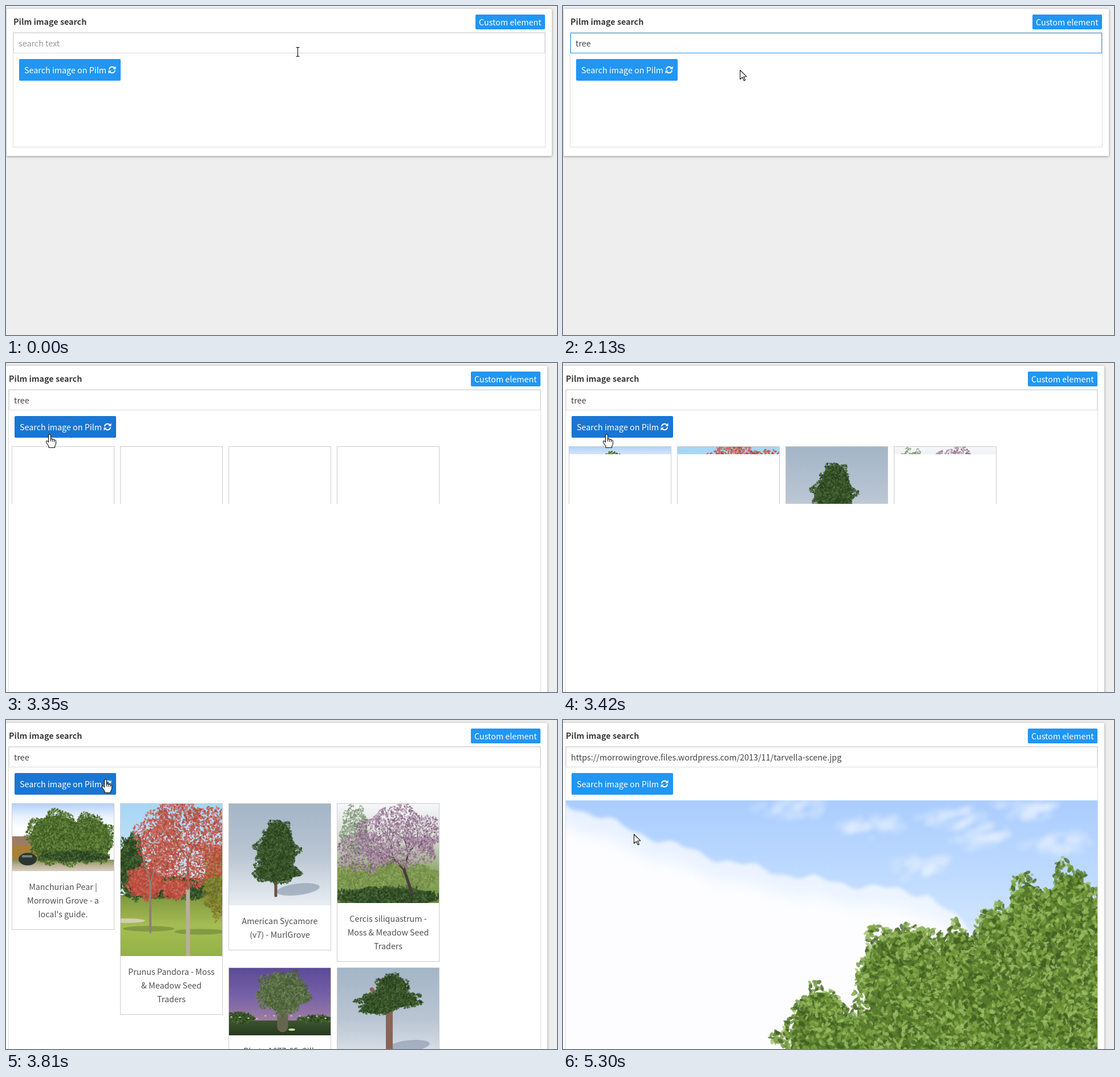
These frames come from a looping animation (966 by 577 pixels, 7390 ms). An HTML page with a canvas:

```html
<!DOCTYPE html>
<html lang="en">
<head>
<meta charset="utf-8">
<title>Image search</title>
<style>
  html, body { margin: 0; width: 966px; height: 577px; overflow: hidden; background: #eee; }
  canvas { display: block; }
</style>
</head>
<body>
<canvas id="stage" width="966" height="577"></canvas>
<script>
const W = 966, H = 577, LOOP = 7390;
const ctx = document.getElementById('stage').getContext('2d');
const FACE = '"Noto Sans CJK JP", "Noto Sans CJK SC", "Noto Sans CJK", "Noto Sans", sans-serif';
const BODY = `14.32px ${FACE}`, BOLD = `700 14.32px ${FACE}`;
const BLUE = '#2196f3', LINE = '#ddd', INK = '#444';
const URL_TEXT = 'https://morrowingrove.files.wordpress.com/2013/11/tarvella-scene.jpg';

let seed = 7;
function rand() {
  seed = (seed + 0x6d2b79f5) | 0;
  let v = Math.imul(seed ^ (seed >>> 15), 1 | seed);
  v = (v + Math.imul(v ^ (v >>> 7), 61 | v)) ^ v;
  return ((v ^ (v >>> 14)) >>> 0) / 4294967296;
}
const spread = range => (rand() - .5) * 2 * range;

// ---- painting helpers ----
function layer() {
  const c = document.createElement('canvas');
  c.width = W; c.height = H;
  return c.getContext('2d');
}
function box(g, x, y, w, h, fill) { g.fillStyle = fill; g.fillRect(x, y, w, h); }
function frame(g, x, y, w, h, color) {
  g.strokeStyle = color; g.lineWidth = 1;
  g.strokeRect(x + .5, y + .5, w - 1, h - 1);
}
function fade(g, y0, y1, ...colors) {
  const grad = g.createLinearGradient(0, y0, 0, y1);
  colors.forEach((c, i) => grad.addColorStop(i / (colors.length - 1), c));
  return grad;
}
function oval(g, x, y, rx, ry, fill, turn = 0) {
  g.fillStyle = fill;
  g.beginPath(); g.ellipse(x, y, rx, ry, turn, 0, 7); g.fill();
}
// A wobbling ellipse of leaves; dense crowns get a solid core.
function crown(g, x, y, rx, ry, size, colors, density = 1.6) {
  if (density > 1) oval(g, x, y, rx * .84, ry * .84, colors[1]);
  const count = rx * ry * 4 * density / (size * size);
  g.globalAlpha = .75;
  for (let i = 0; i < count; i++) {
    const a = rand() * 7, lobes = 1 + .09 * Math.sin(a * 5 + x) + .07 * Math.sin(a * 9 + y);
    const r = Math.sqrt(rand()) * lobes;
    const color = colors[Math.floor(rand() * colors.length)];
    oval(g, x + Math.cos(a) * rx * r, y + Math.sin(a) * ry * r,
      size * (.5 + rand() * .6), size * (.3 + rand() * .3), color, rand() * 3);
  }
  g.globalAlpha = 1;
}
// A stem that forks until its depth runs out.
function branch(g, color, x, y, length, width, depth = 0, angle = -Math.PI / 2) {
  const x2 = x + Math.cos(angle) * length, y2 = y + Math.sin(angle) * length;
  g.strokeStyle = color; g.lineWidth = width; g.lineCap = 'round';
  g.beginPath(); g.moveTo(x, y); g.lineTo(x2, y2); g.stroke();
  if (!depth) return;
  for (const side of [-1, 1]) {
    branch(g, color, x2, y2, length * .75, width * .6, depth - 1, angle + side * (.25 + rand() * .4));
  }
}
function inside(g, x, y, w, h, paint) {
  g.save();
  g.beginPath(); g.rect(x, y, w, h); g.clip();
  paint(g);
  g.restore();
}

const GREEN = ['#385421', '#4a6829', '#5d7d34', '#74934a'];
const DARK = ['#243b1d', '#314d26', '#3f5c2e', '#52703d'];
const FRESH = ['#405f22', '#557a2c', '#698f36', '#7fa546', '#9cbd66'];
const RED = ['#a3493c', '#b94b3d', '#c95746', '#d27361'];
const PINK = ['#785e74', '#977791', '#aa89a6', '#bda1bb'];

// ---- thumbnails, each painted in a 180 px wide column ----
function studio(g, h, shadowX, shadowY) {
  box(g, 0, 0, 180, h, fade(g, 0, h, '#a4b5c7', '#b9c5d2', '#e9eef3'));
  oval(g, shadowX, shadowY, 38, 10, '#8d9db0aa', -.12);
}
function bushPhoto(g) {
  box(g, 0, 0, 180, 118, fade(g, 0, 45, '#b4d2f8', '#eaf2fd', '#fff'));
  box(g, 0, 60, 50, 40, '#a98038');
  box(g, 0, 57, 34, 16, '#9b7c67');
  box(g, 0, 98, 180, 20, fade(g, 98, 118, '#828e55', '#bcb196', '#d5cfc1'));
  crown(g, 78, 61, 53, 48, 2.6, GREEN);
  crown(g, 135, 62, 44, 44, 2.6, GREEN);
  crown(g, 108, 92, 62, 10, 2.6, DARK);
  oval(g, 28, 97, 16, 11, '#2b3633');
  box(g, 18, 90, 18, 4, '#71827d');
}
function redPhoto(g) {
  box(g, 0, 0, 180, 267, fade(g, 0, 150, '#a6d5f5', '#d8ecf7'));
  box(g, 0, 160, 180, 107, fade(g, 160, 267, '#7e963e', '#a5bd53', '#93b247'));
  crown(g, 20, 110, 25, 58, 3, DARK);
  crown(g, 90, 148, 95, 19, 3, DARK);
  crown(g, 170, 137, 25, 62, 3, ['#5d6a2c', '#7e812f', '#99913a']);
  crown(g, 45, 138, 34, 29, 2.5, RED);
  crown(g, 96, 151, 22, 17, 2.5, RED);
  oval(g, 10, 205, 34, 4, '#d0ceb0');
  for (const x of [50, 140]) oval(g, x, 216 + x * .06, 45, 5, '#6d853a99');
  branch(g, '#8d8072', 53, 225, 85, 4, 1);
  branch(g, '#b9ae9c', 119, 267, 118, 7);
  branch(g, '#87675c', 119, 149, 50, 4, 3);
  crown(g, 118, 72, 72, 80, 2.8, RED, 1);
  crown(g, 66, 64, 40, 56, 2.8, RED, .7);
}
function sycamorePhoto(g) {
  studio(g, 178, 122, 150);
  branch(g, '#69513c', 83, 161, 35, 5);
  crown(g, 87, 53, 25, 25, 2.5, DARK);
  crown(g, 84, 84, 39, 31, 2.5, DARK);
  crown(g, 83, 119, 41, 21, 2.5, DARK);
}
function blossomPhoto(g) {
  box(g, 0, 0, 180, 174, fade(g, 0, 174, '#f6f7fa', '#d9ddd8', '#93aa70', '#6f9141'));
  crown(g, 31, 49, 24, 47, 2.5, ['#6d8a65', '#829c76', '#a0b297'], 1);
  crown(g, 90, 128, 100, 27, 3, ['#68853f', '#7b954c', '#91a763']);
  crown(g, 90, 163, 100, 18, 3, DARK);
  branch(g, '#4b3b40', 132, 157, 42, 5, 4, -1.9);
  crown(g, 110, 58, 74, 54, 2.5, PINK, .9);
  crown(g, 46, 85, 46, 36, 2.5, PINK, .8);
}
function duskPhoto(g) {
  box(g, 0, 0, 180, 118, fade(g, 0, 95, '#5b4a98', '#7560a7', '#a07fa3'));
  box(g, 0, 92, 180, 26, fade(g, 92, 118, '#3e552f', '#26391f'));
  crown(g, 20, 87, 25, 10, 3, DARK);
  crown(g, 155, 89, 35, 6, 3, DARK);
  for (let x = 5; x < 180; x += 15) oval(g, x, 86 + spread(3), 1.8, 1, '#e8d6a1');
  branch(g, '#66664f', 95, 103, 28, 19);
  crown(g, 95, 43, 46, 38, 2.5, ['#43573a', '#52663f', '#63774b', '#76885a']);
  oval(g, 111, 108, 6, 2, '#c6e1a3');
}
function pinePhoto(g) {
  studio(g, 180, 125, 137);
  branch(g, '#8b6354', 92, 150, 70, 12, 1);
  crown(g, 97, 32, 29, 22, 2.5, DARK);
  crown(g, 93, 56, 56, 17, 2.5, DARK);
  crown(g, 71, 71, 32, 11, 2.5, DARK);
}

const ROWS = [147, 435];
const cards = [
  { col: 0, row: 0, pic: 118, paint: bushPhoto, text: ['Manchurian Pear |', 'Morrowin Grove - a', "local's guide."] },
  { col: 1, row: 0, pic: 267, paint: redPhoto, text: ['Prunus Pandora - Moss', '& Meadow Seed', 'Traders'] },
  { col: 2, row: 0, pic: 178, paint: sycamorePhoto, text: ['American Sycamore', '(v7) - MurlGrove'] },
  { col: 3, row: 0, pic: 174, paint: blossomPhoto, text: ['Cercis siliquastrum -', 'Moss & Meadow Seed', 'Traders'] },
  { col: 2, row: 1, pic: 118, paint: duskPhoto, text: ['Photo 1677-05: Silk'] },
  { col: 3, row: 1, pic: 180, paint: pinePhoto, text: [] }
];
const gallery = layer();
for (const c of cards) {
  c.x = 10 + c.col * 190;
  c.y = ROWS[c.row];
  c.h = c.pic + 31 + c.text.length * 24;
  gallery.save();
  gallery.translate(c.x, c.y);
  inside(gallery, 1, 0, 178, c.pic, c.paint);
  gallery.restore();
}

// ---- enlarged photo ----
function cloudBank(g, drop, fill) {
  g.beginPath();
  g.moveTo(-20, 600);
  for (let x = -20; x <= 800; x += 6) {
    const bulge = 25 * Math.sin(Math.PI * x / 560) + 5 * Math.sin(x / 19) + 3 * Math.sin(x / 8);
    g.lineTo(x, 144 + drop + x * .27 + bulge + Math.max(0, x - 640) * .7);
  }
  g.lineTo(800, 600);
  g.fillStyle = fill;
  g.fill();
}
function puff(g, x, y) {
  for (let i = 0; i < 26; i++) {
    oval(g, x + spread(32) + spread(32), y + spread(11) + spread(11), 6 + rand() * 16, 3 + rand() * 6, '#f6f9ff3a', -.3);
  }
}
const photo = layer();
inside(photo, 5, 141, 932, 436, g => {
  box(g, 5, 141, 932, 436, fade(g, 141, 420, '#aacdff', '#bfdbff', '#dfedff'));
  g.filter = 'blur(3px)';
  cloudBank(g, 0, '#f8faffc8');
  g.filter = 'blur(14px)';
  cloudBank(g, 35, '#fdfdff');
  g.filter = 'blur(4px)';
  for (const [x, y] of [[540, 188], [690, 172], [740, 205], [640, 258], [870, 220], [820, 160], [400, 152]]) puff(g, x, y);
  g.filter = 'none';

  const domes = [[450, 545, 55, 80], [597, 455, 86, 100], [695, 450, 50, 90], [755, 415, 34, 95], [815, 385, 46, 115], [890, 370, 58, 115]];
  for (const [x, y, rx, ry] of domes) crown(g, x, y, rx, ry, 6, FRESH);
  crown(g, 600, 580, 215, 75, 6, FRESH);
  crown(g, 820, 500, 170, 130, 6, FRESH);
});

// ---- pointers ----
const ARROW = new Path2D('M0 0V16L4 12.5L6.8 18.5L9 17.5L6.3 11.6L11.2 11.2Z');
const HAND = new Path2D('M-2 1.5Q-2-.5 0-.5Q2-.5 2 1.5V8Q4 6.5 5 8.5Q7.5 7.5 8 9.5Q11 9 11 12V16Q10.5 19 9 20.5V23H-1.5V20.5L-5.5 14.5Q-7 11-4.5 11Q-3.5 11-2 13.5Z');
const FINGERS = new Path2D('M2 8V12M5 9V12.5M8 10V13');
const BEAM = new Path2D('M-3-8H-1L0-7L1-8H3M0-7V7M-3 8H-1L0 7L1 8H3');
function pointer(kind, x, y) {
  ctx.save();
  ctx.translate(x + .5, y + .5);
  ctx.lineWidth = 1.1; ctx.lineJoin = 'round';
  ctx.strokeStyle = '#111'; ctx.fillStyle = '#fff';
  if (kind === 'beam') {
    ctx.stroke(BEAM);
  } else {
    const shape = kind === 'hand' ? HAND : ARROW;
    ctx.fill(shape); ctx.stroke(shape);
    if (kind === 'hand') ctx.stroke(FINGERS);
  }
  ctx.restore();
}

// ---- timing ----
const TICK = 77;
const trips = [
  { from: 1810, to: 2510, end: [108, 143] },
  { from: 2590, to: 2820, end: [76, 125] },
  { from: 3580, to: 3810, end: [174, 104] },
  { from: 4190, to: 4660, end: [124, 200] }
];
function mouseAt(t) {
  let [x, y] = [511, 80];
  for (const { from, to, end } of trips) {
    if (t < from) break;
    const steps = Math.round((to - from) / TICK);
    const p = Math.min(1, (Math.floor((t - from) / (to - from) * steps + 1e-6) + 1) / (steps + 1));
    const eased = p * p * (3 - 2 * p);
    x += (end[0] - x) * eased; y += (end[1] - y) * eased;
  }
  return [Math.round(x), Math.round(y)];
}
const ramp = (t, from, to) => Math.max(0, Math.min(1, (t - from) / (to - from)));
function blend(a, b, p) {
  return `rgb(${a.map((v, i) => Math.round(v + (b[i] - v) * p))})`;
}

// ---- interface ----
function write(text, x, y, color, font = BODY, align = 'left') {
  ctx.font = font; ctx.fillStyle = color; ctx.textAlign = align;
  ctx.fillText(text, x, y);
}
function plate(x, y, w, h, color) {
  ctx.fillStyle = color;
  ctx.beginPath(); ctx.roundRect(x, y, w, h, 2); ctx.fill();
}
function raised(x, y, w, h, alpha) {
  ctx.save();
  ctx.shadowColor = `rgba(0,0,0,${alpha})`; ctx.shadowBlur = 4; ctx.shadowOffsetY = 1;
  plate(x, y, w, h, '#fff');
  ctx.restore();
}
function refreshIcon(x, y) {
  ctx.save();
  ctx.translate(x, y);
  ctx.strokeStyle = ctx.fillStyle = '#fff'; ctx.lineWidth = 2;
  for (let i = 0; i < 2; i++) {
    ctx.beginPath(); ctx.arc(0, 0, 5.2, Math.PI * 1.04, Math.PI * 1.8); ctx.stroke();
    ctx.fill(new Path2D('M6.5-6.5V-1.2H1.2Z'));
    ctx.rotate(Math.PI);
  }
  ctx.restore();
}
function typed(t) {
  const keys = [350, 810, 1260, 1440].filter(k => t >= k);
  return { text: 'tree'.slice(0, keys.length), last: keys.pop() ?? 260 };
}
function drawForm(t, tall) {
  raised(1, 5, 956, tall ? 700 : 258, .4);
  write('Pilm image search', 13, 33, '#3a3a3a', BOLD);
  plate(823, 15, 122, 26, BLUE);
  write('Custom element', 829, 34, '#fff');
  frame(ctx, 12, 46, 934, tall ? 700 : 202, LINE);

  const focus = ramp(t, 170, 350) * (t >= 260) * (1 - ramp(t, 2900, 2970));
  frame(ctx, 13, 47, 932, 36, blend([221, 221, 221], [33, 150, 243], focus));
  const { text, last } = typed(t);
  const value = t >= 5210 ? URL_TEXT : text;
  write(value || 'search text', 22, 71, value ? INK : '#999');
  if (t >= 260 && t < 2900 && (t - last) % 1000 < 500) {
    box(ctx, Math.round(22 + (text ? ctx.measureText(text).width : 0)), 56, 1, 19, '#222');
  }

  const hover = ramp(t, 2590, 2760) * (1 - ramp(t, 4260, 4500));
  plate(23, 93, 178, 38, blend([33, 150, 243], [25, 118, 210], hover));
  write('Search image on Pilm', 32, 118, '#fff');
  refreshIcon(186, 112);

  if (t >= 350 && t < 1440) {
    raised(13, 84, 72, 52, .45);
    write('tree', 25, 115, '#111', '12.2px "Open Sans", sans-serif');
  }
}
function loadedHeight(t, card) {
  if (t >= 3500) return Math.min(card.pic, H - card.y);
  if (t < 3420 || card.row) return 0;
  return card.paint === sycamorePhoto ? 100 : 13;
}
function drawCards(t, overFirst) {
  ctx.save();
  if (t < 3500) { ctx.beginPath(); ctx.rect(0, 140, W, 107); ctx.clip(); }
  for (const c of cards) {
    const shown = loadedHeight(t, c);
    if (shown) ctx.drawImage(gallery.canvas, c.x, c.y, 180, shown, c.x, c.y, 180, shown);
    frame(ctx, c.x, c.y - 1, 180, c.h + 1, c === cards[0] && overFirst ? '#555' : '#ccc');
    c.text.forEach((line, n) => write(line, c.x + 90, c.y + c.pic + 33 + n * 24, '#505050', BODY, 'center'));
  }
  ctx.restore();
}
function draw(t) {
  const tall = t >= 3350, opened = t >= 5210, [x, y] = mouseAt(t);
  box(ctx, 0, 0, W, H, '#eee');
  ctx.save();
  if (tall) ctx.translate(-8, 0);
  drawForm(t, tall);
  ctx.restore();

  const overFirst = tall && x < 190 && y >= 147;
  if (opened) ctx.drawImage(photo.canvas, 0, 0);
  else if (tall) drawCards(t, overFirst);

  const overButton = x > 15 && x < 201 && y >= 93 && y < 131;
  const kind = opened ? 'arrow' : y < 83 ? 'beam' : overButton || overFirst ? 'hand' : 'arrow';
  pointer(kind, x, y);
}

const start = performance.now();
function tick() {
  draw((performance.now() - start) % LOOP);
  requestAnimationFrame(tick);
}
tick();
</script>
</body>
</html>
```
